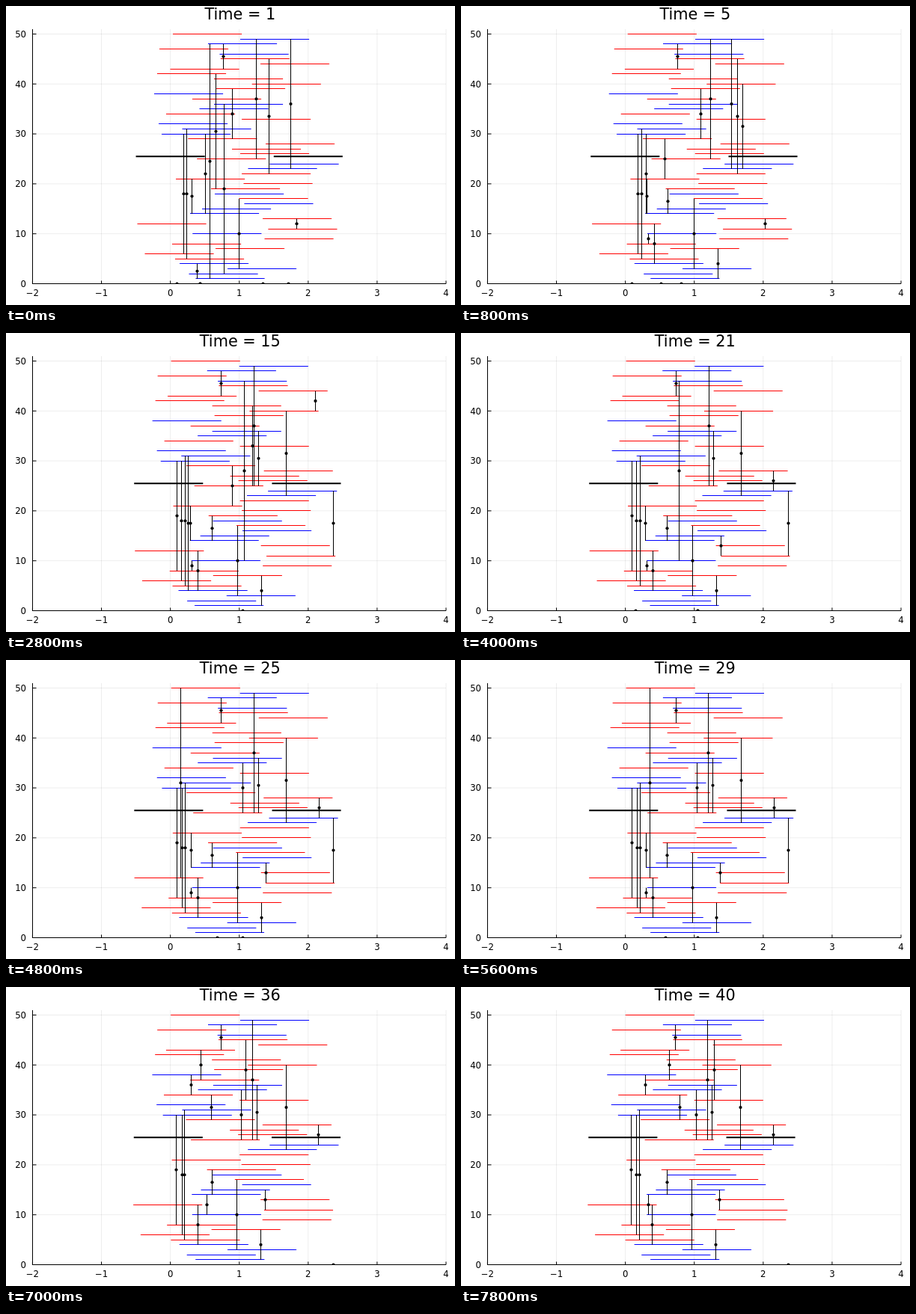
Recreate the animation shown at these times as an HTML page with a canvas. Size 600x400 px, loop 8 s.

```html
<!DOCTYPE html>
<html lang="en">
<head>
<meta charset="utf-8">
<title>Filaments and motors</title>
<style>
  html, body { margin: 0; width: 100%; height: 100%; overflow: hidden; background: #fff; }
  canvas { display: block; width: 600px; height: 400px; }
</style>
</head>
<body>
<canvas id="stage" width="600" height="400"></canvas>
<script>
const ctx = document.getElementById('stage').getContext('2d');
const STEPS = 40, STEP_MS = 200, UNIT = 92.1;
const WALK = 4.605;   // stride of a motor on a like-coloured pair
const SLIDE = .08;    // push of a motor on an unlike pair
const RECOIL = .056;  // shift of the whole network per stride
const LEFT = 35.5, RIGHT = 588, TOP = 31, BOTTOM = 371.5;
const px = v => 219.6 + UNIT * v;
const py = v => BOTTOM - 6.68 * v;
const crisp = v => Math.floor(v) + .5;

// Starting left ends of filaments 1 to 50, bottom to top, and their colours.
const starts = [
  253.5, 244.5, 296, 232, 226, 185.5, 280, 222, 345.5, 249.3,
  350.4, 175.5, 343, 246, 262, 318.4, 311.5, 279, 274, 317.5,
  227, 315, 323.5, 352.5, 255.2, 313, 302, 347, 243.3, 208,
  235.5, 204, 315, 214, 258.5, 278, 249, 198, 281, 328.7,
  278, 202, 219.5, 340, 286.8, 285.5, 205, 270, 313, 223
];
const colors = 'bbbbrrrrrb' + 'rrrbbbrbrr' + 'rrbbrrrrrb' + 'bbrrbbrbrr' + 'rrrrrbrbbr';
const isBlue = n => colors[n - 1] === 'b';

// Motors at the start: x, then the two filaments they hold, if any.
const motors = [
  [237, 6, 30], [241.5, 5, 31], [248.5, 14, 21], [255, 1, 4], [266, 14, 30],
  [272.5, 1, 48], [280.8, 19, 42], [291, 2, 36], [290, 43, 48], [302, 29, 39],
  [311.5, 3, 17], [334, 25, 49], [351.5, 22, 45], [380, 23, 49], [388.5, 11, 13],
  [228], [259.2], [259], [343.5], [377]
].map(([x, a = 0, b = 0]) => ({ x, a, b }));

// New grips by step: motor and its filaments (none = let go).
const grips = {
  3: [[3, 8, 10], [7, 14, 19], [17, 4, 12], [18, 1, 7], [19, 23, 40]],
  1: [[16, 21, 29]],
  6: [[5, 21, 29], [6, 25, 41], [12, 40, 44]],
  14: [[4, 4, 31], [9, 25, 36], [13, 10, 46], [14, 11, 24], [15, 8, 30]],
  18: [[6, 11, 15], [12, 24, 28]],
  24: [[4, 12, 50], [5, 25, 35]],
  26: [[13, 18, 36]],
  30: [[4], [14]],
  32: [[2, 37, 43], [3, 34, 38], [4, 29, 34]],
  34: [[13, 10, 14], [16, 33, 45]]
};

const lefts = [0, ...starts];
let barShift = 0;

// Like-coloured pairs carry a motor to their end; unlike pairs slide apart.
function advance() {
  const bound = motors.filter(m => m.a);
  const strides = m => isBlue(m.a) !== isBlue(m.b) ? 0 : isBlue(m.a) ? -1 : 1;
  const recoil = -RECOIL * bound.reduce((sum, m) => sum + strides(m), 0);
  const moves = lefts.map(() => recoil);
  for (const m of bound) {
    if (strides(m)) continue;
    for (const n of [m.a, m.b]) moves[n] += isBlue(n) ? SLIDE : -SLIDE;
  }
  barShift += recoil;
  moves.forEach((move, n) => lefts[n] += move);

  for (const m of bound) {
    const dir = strides(m), [l1, l2] = [lefts[m.a], lefts[m.b]];
    m.x += (moves[m.a] + moves[m.b]) / 2 + WALK * dir;
    const past = dir > 0 ? m.x > Math.min(l1, l2) + UNIT : m.x < Math.max(l1, l2);
    if (dir && past) m.a = m.b = 0;
  }
}

const history = [];
for (let step = 0; step < STEPS; step++) {
  if (step) advance();
  for (const [id, a = 0, b = 0] of grips[step] || []) Object.assign(motors[id], { a, b });
  history.push({ barShift, lefts: [...lefts], motors: motors.map(m => ({ ...m })) });
}

function line(x1, y1, x2, y2, color, width = 1) {
  ctx.strokeStyle = color;
  ctx.lineWidth = width;
  ctx.beginPath();
  ctx.moveTo(x1, y1);
  ctx.lineTo(x2, y2);
  ctx.stroke();
}

function label(text, x, y, size, align) {
  ctx.font = `${size}px "DejaVu Sans", sans-serif`;
  ctx.textAlign = align;
  ctx.fillText(text, x, y);
}

function drawAxes() {
  const grid = 'rgba(0,0,0,.07)';
  for (let v = -2; v <= 4; v++) {
    line(px(v), TOP, px(v), BOTTOM, grid);
    line(px(v), BOTTOM, px(v), BOTTOM - 4, '#000');
    label(v < 0 ? '\u2212' + -v : v, px(v), 387.5, 11.7, 'center');
  }
  for (let v = 0; v <= 50; v += 10) {
    line(LEFT, py(v), RIGHT, py(v), grid);
    line(LEFT, py(v), LEFT + 5, py(v), '#000');
    label(v, 27, py(v) + 4.3, 11.7, 'right');
  }
  line(LEFT, TOP, LEFT, BOTTOM + .5, '#000');
  line(LEFT - .5, BOTTOM, RIGHT, BOTTOM, '#000');
}

function draw(step) {
  const { barShift, lefts, motors } = history[step];
  ctx.fillStyle = '#fff';
  ctx.fillRect(0, 0, 600, 400);
  ctx.fillStyle = '#000';
  label('Time = ' + (step + 1), 312.8, 18, 20.8, 'center');
  drawAxes();

  ctx.save();
  ctx.beginPath();
  ctx.rect(LEFT, TOP, RIGHT - LEFT, BOTTOM - TOP);
  ctx.clip();
  for (let n = 1; n < lefts.length; n++) {
    const y = crisp(py(n));
    line(lefts[n], y, lefts[n] + UNIT, y, isBlue(n) ? '#00f' : '#f00');
  }
  for (const v of [-.5, 1.5]) {
    const x = px(v) + barShift;
    line(x, py(25.5), x + UNIT, py(25.5), '#000', 2);
  }
  for (const { x, a, b } of motors) {
    if (a) line(crisp(x), py(a), crisp(x), py(b), '#000');
    ctx.beginPath();
    ctx.arc(crisp(x), py((a + b) / 2), 2.1, 0, 2 * Math.PI);
    ctx.fill();
  }
  ctx.restore();
}

let shown = -1;
function tick() {
  const step = Math.floor(performance.now() / STEP_MS) % STEPS;
  if (step !== shown) draw(shown = step);
  requestAnimationFrame(tick);
}
tick();
</script>
</body>
</html>
```
